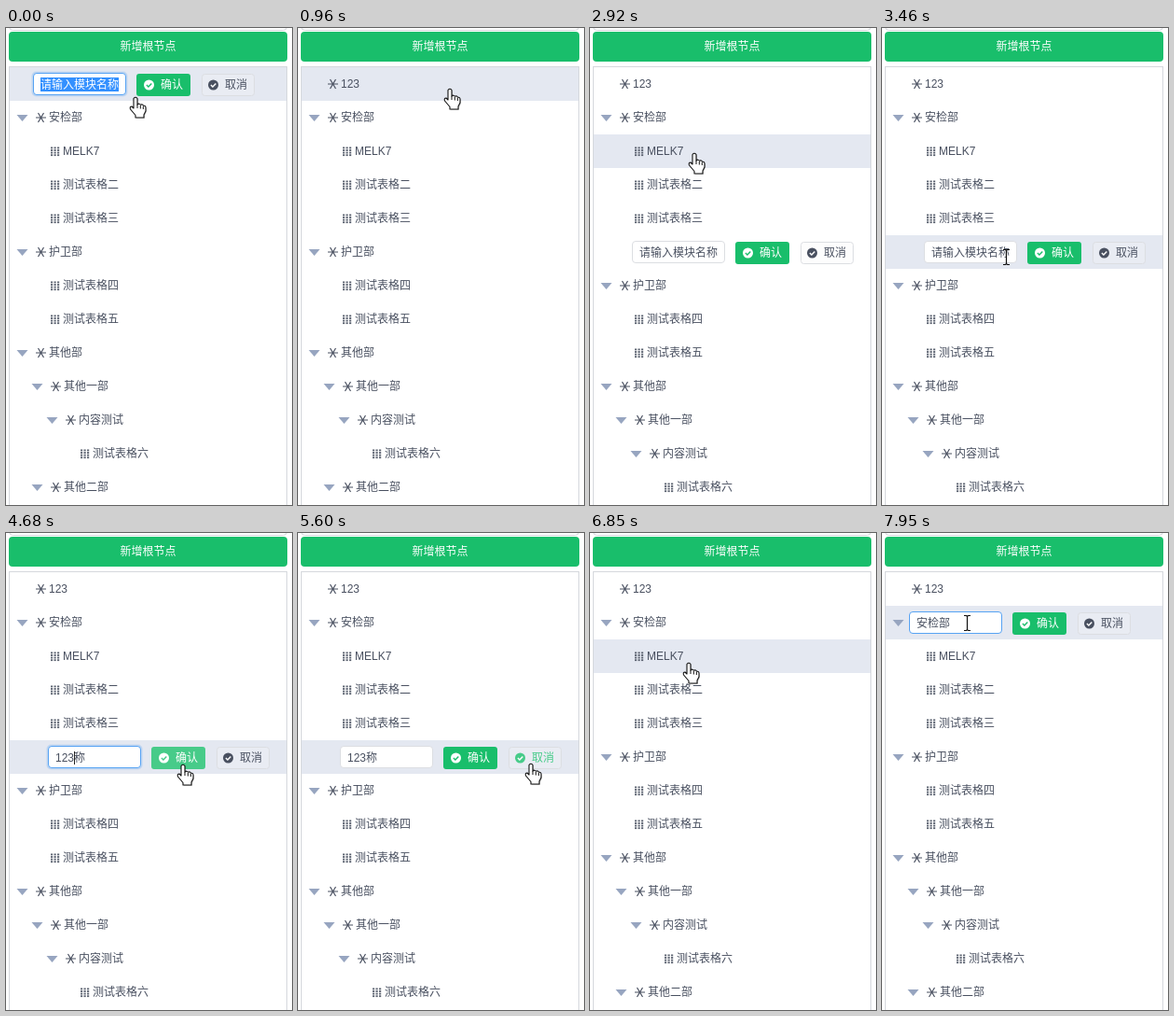
An HTML page for the animation above (8000 ms loop, 307 by 511 pixels).

```html
<!DOCTYPE html>
<html lang="zh">
<head>
<meta charset="utf-8">
<title>Tree editor</title>
<style>
html, body { margin: 0; width: 100%; height: 100%; overflow: hidden; background: #fff; }
svg { display: block; width: 100vw; height: 100vh; }
text { font: 12px "Liberation Sans", "Noto Sans CJK SC", "Noto Sans CJK", sans-serif; fill: #495060; white-space: pre; }
.strong { font-weight: 500; fill: #fff; }
</style>
</head>
<body>
<svg id="stage" viewBox="0 0 307 511"></svg>
<script>
const LOOP = 8000, ROW = 36, TOP = 42, DIGIT = 6.674;
const HINT = '请输入模块名称';
const GREEN = '#19be6b', GREEN_HOVER = '#47cb89', INK = '#495060', BLUE = '#57a3f3';
const stage = document.getElementById('stage');

// Bursts of screen updates: start, end, count.
const bursts = [[0, 0, 1], [150, 960, 7], [1240, 2150, 7], [2310, 2310, 1], [2770, 3730, 8],
  [3850, 4820, 8], [4940, 5840, 8], [6400, 7420, 8], [7790, 7950, 2]];
const steps = bursts.flatMap(([from, to, n]) => Array.from({ length: n },
  (_, i) => Math.floor((from + (to - from) * i / Math.max(1, n - 1)) / 10) * 10));

// Pointer path: time, x, y.
const path = [[0, 139, 74], [420, 139, 74], [690, 163, 65], [1100, 163, 65], [2150, 134, 93],
  [2310, 109, 93], [2760, 109, 93], [2900, 112, 134], [3030, 114, 160], [3450, 133, 245],
  [3730, 125, 245], [3980, 18, 245], [4260, 18, 245], [4540, 120, 246], [4680, 190, 248],
  [4820, 207, 248], [5500, 250, 247], [6390, 250, 247], [6400, 112, 171], [7420, 98, 94],
  [7790, 95, 94], [7950, 91, 96]];

function pointerAt(t) {
  const i = path.findIndex(p => p[0] > t);
  if (i < 0) return path[path.length - 1].slice(1);
  const [a, b] = [path[i - 1], path[i]];
  const u = (t - a[0]) / (b[0] - a[0]);
  return [1, 2].map(k => Math.round(a[k] + (b[k] - a[k]) * u));
}

const clamp = (v, lo, hi) => Math.max(lo, Math.min(hi, v));
const typed = (t, start, gap) => clamp(Math.floor((t - start) / gap) + 1, 0, 3);
const inside = ([x, y], l, t, w, h) => x >= l && x < l + w && y >= t && y < t + h;
const text = (x, y, s, attrs = '') => `<text x="${x}" y="${y}" ${attrs}>${s}</text>`;
const rect = (x, y, w, h, fill, more = '') =>
  `<rect x="${x}" y="${y}" width="${w}" height="${h}" fill="${fill}" ${more}/>`;
const line = (d, color, width, more = '') =>
  `<path d="${d}" fill="none" stroke="${color}" stroke-width="${width}" ${more}/>`;

function treeRows(t) {
  const node = (depth, label, open = true) => ({ depth, label, open });
  const leaf = (depth, label) => ({ depth, label, leaf: true });
  const first = node(0, '123', false);
  if (t < 960) {
    const n = typed(t, 150, 130);
    first.edit = { value: n ? '123'.slice(0, n) : HINT, focus: true, glow: true,
      select: n ? null : [0, 7], caret: n };
  }
  const second = node(0, '安检部');
  if (t >= 7790) second.edit = { value: '安检部', focus: t >= 7950 };

  const rows = [first, second, leaf(1, 'MELK7'), leaf(1, '测试表格二'), leaf(1, '测试表格三')];
  if (t >= 2770 && t < 6400) {
    const n = typed(t, 4120, 140);
    const focus = t >= 3590 && t < 5450;
    const edge = clamp(Math.round((pointerAt(t)[0] - 53) / 12), 0, 6);
    rows.push({ depth: 1, edit: {
      value: n ? '123'.slice(0, n) + '称' : HINT, focus, glow: focus,
      select: t >= 3850 && !n && edge < 6 ? [edge, 6] : null,
      caret: n, caretX: n ? null : 72
    } });
  }
  rows.push(node(0, '护卫部'), leaf(1, '测试表格四'), leaf(1, '测试表格五'), node(0, '其他部'),
    node(1, '其他一部'), node(2, '内容测试'), leaf(3, '测试表格六'), node(1, '其他二部'));
  return rows;
}

function gridIcon(x, y) {
  let s = '';
  for (let c = 0; c < 3; c++)
    for (let r = 0; r < 4; r++) s += rect(x + c * 3.5, y - 4.5 + r * 2.6, 2.2, 1.8, '#5c6371');
  return s;
}

const starIcon = (x, y) =>
  line(`M${x} ${y}h11M${x + 2.5} ${y - 5}l6 10M${x + 8.5} ${y - 5}l-6 10`, INK, 1.2);

const checkIcon = (x, y, fill, mark) => `<circle cx="${x}" cy="${y}" r="5.5" fill="${fill}"/>` +
  line(`M${x - 2.6} ${y}l2 2 3.4-3.6`, mark, 1.4);

function editor(e, x, y, pointer) {
  const mid = y + 18, tx = x + 8;
  const okHover = inside(pointer, x + 111, y + 7, 58, 24);
  const noHover = inside(pointer, x + 181, y + 7, 57, 24);
  const noInk = noHover ? GREEN_HOVER : INK;
  let s = '';
  if (e.glow) s += rect(x - 1.5, y + 4.5, 103, 27, 'rgba(45,140,240,.2)', 'rx="5"');
  s += rect(x + .5, y + 6.5, 99, 23, '#fff', `rx="3.5" stroke="${e.focus ? BLUE : '#dcdee2'}"`);
  if (e.select) {
    const [a, b] = e.select;
    s += rect(tx + a * 12, mid - 7, (b - a) * 12, 15, '#3390ff');
    s += text(tx, mid + 5, e.value.slice(0, a) + `<tspan fill="#fff">${e.value.slice(a, b)}</tspan>` + e.value.slice(b));
  } else {
    s += text(tx, mid + 5, e.value);
    if (e.glow) s += rect(Math.round(tx + (e.caretX ?? e.caret * DIGIT)), mid - 6, 1, 14, '#222');
  }
  const ok = okHover ? GREEN_HOVER : GREEN;
  s += rect(x + 111, y + 7, 58, 24, ok, 'rx="3"');
  s += checkIcon(x + 124.5, mid + 1, '#fff', ok) + text(x + 137, mid + 5, '确认', 'class="strong"');
  s += rect(x + 181.5, y + 7.5, 56, 23, 'rgba(247,247,247,.25)', 'rx="3" stroke="#dcdee2"');
  s += checkIcon(x + 193.5, mid + 1, noInk, '#fff') + text(x + 206, mid + 5, '取消', `style="fill:${noInk}"`);
  return s;
}

function treeRow(row, y, pointer) {
  const dx = row.depth * 16, mid = y + 18;
  let s = '';
  if (row.open) s += `<path d="M${11.5 + dx} ${mid - 3}h12l-6 7z" fill="#97a5c0"/>`;
  if (row.edit) return s + editor(row.edit, 29 + dx, y, pointer);
  s += row.leaf ? gridIcon(32 + dx, mid) : starIcon(32 + dx, mid);
  return s + text((row.leaf ? 45 : 46) + dx, mid + 4, row.label);
}

function handCursor(x, y) {
  const d = 'M-2 1.5Q0-1 2 1.5V8Q4 6.2 5.5 8.3Q7.5 7.2 8.5 9.3Q11 8.8 11 11.5V15L9 19V22H0V19.5L-5.5 13Q-6.5 10-4 10L-2 12Z';
  return `<g transform="translate(${x} ${y})"><path d="${d}" transform="translate(1 1)" fill="rgba(0,0,0,.2)"/>` +
    `<path d="${d}" fill="#fff" stroke="#111" stroke-width="1.1" stroke-linejoin="round"/>` +
    line('M2 8v4M5.3 9v3.5M8.3 10v3', '#111', 1) + '</g>';
}

const beamCursor = (x, y) =>
  line(`M${x - 3} ${y - 7.5}h2.5l1 1 1-1h2.5M${x + .5} ${y - 7}v15M${x - 3} ${y + 8.5}h2.5l1-1 1 1h2.5`, '#111', 1.2);

function render(t) {
  const rows = treeRows(t), pointer = pointerAt(t);
  // The hover band trails briefly after the editor closes.
  const hoverY = pointer[1] + (t >= 6400 && t < 6540 ? ROW : 0);
  const hover = Math.floor((hoverY - TOP) / ROW);
  let overInput = false;
  let s = rect(3.5, -10, 298, 12.5, '#fff', 'rx="4" stroke="#d5d8dd"') +
    rect(3, 4, 299, 32, GREEN, 'rx="4"') +
    text(152.5, 24, '新增根节点', 'class="strong" text-anchor="middle"') +
    rect(3.5, 41.5, 298, 490, '#fff', 'stroke="#d5d8dd"') +
    rect(4, TOP + hover * ROW, 297, ROW, '#e4e8f1');
  rows.forEach((row, i) => {
    const y = TOP + i * ROW;
    s += treeRow(row, y, pointer);
    if (row.edit && inside(pointer, 29 + row.depth * 16, y + 6, 100, 24)) overInput = true;
  });
  stage.innerHTML = s + (overInput ? beamCursor : handCursor)(...pointer);
}

let shown = -1;
const start = performance.now();
function tick() {
  const t = (performance.now() - start) % LOOP;
  const step = steps.filter(v => v <= t).pop();
  if (step !== shown) render(shown = step);
  requestAnimationFrame(tick);
}
tick();
</script>
</body>
</html>
```
